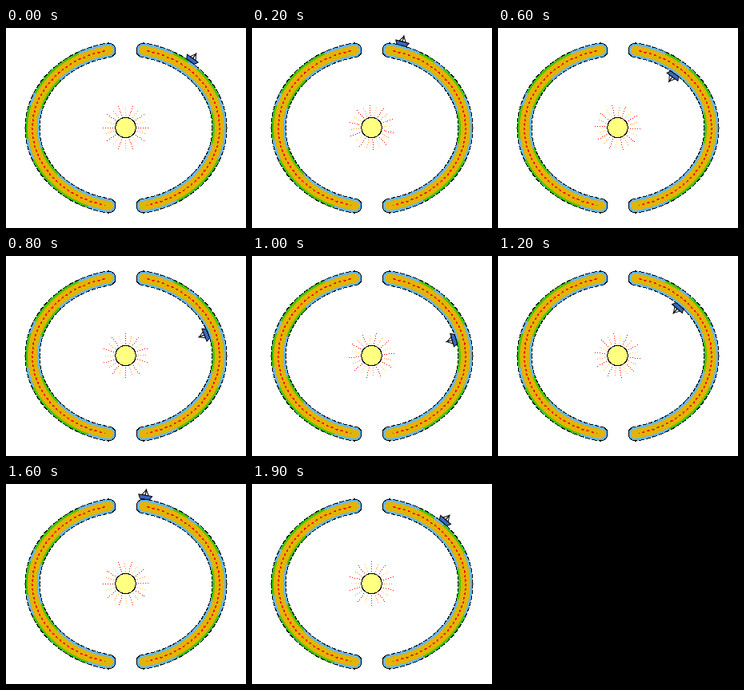
Recreate the animation shown at these times as an HTML page with a canvas. Size 300 by 251 pixels, loop 2000 ms.

```html
<!DOCTYPE html>
<html lang="en">
<head>
<meta charset="utf-8">
<title>Boat around a ring</title>
<style>
html, body { margin: 0; width: 100%; height: 100%; overflow: hidden; background: #fff; }
canvas { display: block; }
</style>
</head>
<body>
<canvas id="stage" width="300" height="251"></canvas>
<script>
const ctx = document.getElementById('stage').getContext('2d');
const LOOP = 2000, STEP = 100;
const CX = 150, CY = 125.5, RX = 117, RY = 99.3;
const TIP = Math.asin(22 / RX);
const REACH = Math.PI / 2 - TIP;

// Route along the ring: u < 0 is outside, 0..1 rounds the tip, u > 1 is inside.
const ROUTE = [
  [0, -0.51], [200, -0.11], [300, 0.28], [400, 0.74], [500, 1.25], [900, 2.33],
  [1000, 2.14], [1400, 1.06], [1600, 0], [1900, -0.6], [2000, -0.51]
];

// Green shores as [offset from the middle line, start angle, end angle].
const LEFT_SHORES = [
  [6, 0.5, 1.15], [6, 1.3, 1.7], [6, 1.95, 2.75], [-6, 0.85, 1.3], [-6, 1.85, 2.25]
];
const RIGHT_SHORES = [
  [6, 0.5, 0.68], [6, 0.8, 1.2], [6, 1.95, 2.6], [-6, 1.36, 1.78]
];

function routeAt(t) {
  const i = ROUTE.findIndex(key => key[0] > t);
  const [t0, u0] = ROUTE[i - 1], [t1, u1] = ROUTE[i];
  return u0 + (u1 - u0) * (t - t0) / (t1 - t0);
}

function place(u, offset) {
  const phi = TIP + Math.max(0, -u, u - 1);
  const turn = Math.PI * Math.min(1, Math.max(0, u));
  const angle = Math.atan2(-RX * Math.cos(phi), RY * Math.sin(phi)) - turn;
  return {
    x: CX + RX * Math.sin(phi) + offset * Math.cos(angle),
    y: CY - RY * Math.cos(phi) + offset * Math.sin(angle),
    angle
  };
}

function dot(x, y, size = 1) {
  ctx.fillRect(Math.round(x - size / 2), Math.round(y - size / 2), size, size);
}

function band(color, width, from, to, cap, offset = 0) {
  ctx.strokeStyle = color;
  ctx.lineWidth = width;
  ctx.lineCap = cap;
  ctx.beginPath();
  ctx.ellipse(CX, CY, RX + offset, RY + offset, 0, from - Math.PI / 2, to - Math.PI / 2);
  ctx.stroke();
}

function outline() {
  ctx.fillStyle = '#000';
  for (let i = 0; i <= 600; i++) {
    if (i % 11 > 7) continue;
    const p = place(-REACH + (1 + 2 * REACH) * i / 600, 9);
    dot(p.x, p.y);
    dot(p.x, 2 * CY - p.y);
  }
}

function middleLine() {
  ctx.fillStyle = '#ff0000';
  const span = Math.PI - 2 * TIP - 0.08;
  for (let i = 0; i <= 240; i++) {
    if (i % 5 > 2) continue;
    const a = TIP + 0.04 + span * i / 240;
    dot(CX + RX * Math.sin(a), CY - RY * Math.cos(a), i % 5 === 1 ? 2 : 1);
  }
}

function halfRing(shores) {
  const end = Math.PI - TIP;
  band('#60b8ff', 18, TIP, end, 'round');
  for (const [offset, from, to] of shores) band('#40c800', 5, from, to, 'butt', offset);
  band('#e2b406', 12, TIP, end, 'round');
  middleLine();
  outline();
}

function ring() {
  halfRing(RIGHT_SHORES);
  ctx.save();
  ctx.translate(2 * CX, 0);
  ctx.scale(-1, 1);
  halfRing(LEFT_SHORES);
  ctx.restore();
}

function sun(step) {
  const x = 149.5, y = 125, rays = 20;
  for (let i = 0; i < rays; i++) {
    const a = (i + step * 0.37) * 2 * Math.PI / rays;
    ctx.fillStyle = ['#ff0000', '#ff9020', '#ff2000', '#ffd040'][i % 4];
    const reach = i % 2 ? 26 : 29;
    for (let r = 16; r <= reach; r += 3) dot(x + r * Math.cos(a), y + r * Math.sin(a));
  }
  ctx.beginPath();
  ctx.arc(x, y, 12.5, 0, 2 * Math.PI);
  ctx.fillStyle = '#ffff80';
  ctx.fill();
  ctx.fillStyle = '#000';
  for (let i = 0; i < 160; i++) {
    const a = i * Math.PI / 80;
    dot(x + 12.7 * Math.cos(a), y + 12.7 * Math.sin(a));
  }
}

function shape(points, fill) {
  ctx.beginPath();
  points.forEach(p => ctx.lineTo(...p));
  ctx.closePath();
  ctx.fillStyle = fill;
  ctx.fill();
  ctx.stroke();
}

function boat(t) {
  const p = place(routeAt(t), 11);
  const returning = t >= 1000;
  ctx.save();
  ctx.translate(p.x, p.y);
  ctx.rotate(p.angle + Math.PI / 2);
  ctx.scale(returning ? 1 : -1, 1);
  ctx.strokeStyle = '#000';
  ctx.lineWidth = 1;
  shape([[0, -10], [-4.5, -3], [0, -3]], '#fff');
  shape([[0, -10], [4, -3], [0, -3]], '#fff');
  shape([[-8.5, -3], [8.5, -3], [6, 2], [-6, 2]], '#3868c0');
  ctx.restore();
}

function draw(now) {
  const step = Math.floor((now % LOOP) / STEP);
  ctx.fillStyle = '#fff';
  ctx.fillRect(0, 0, 300, 251);
  ring();
  sun(step);
  boat(step * STEP);
}

const start = performance.now();
function tick() {
  draw(performance.now() - start);
  requestAnimationFrame(tick);
}
tick();
</script>
</body>
</html>
```
